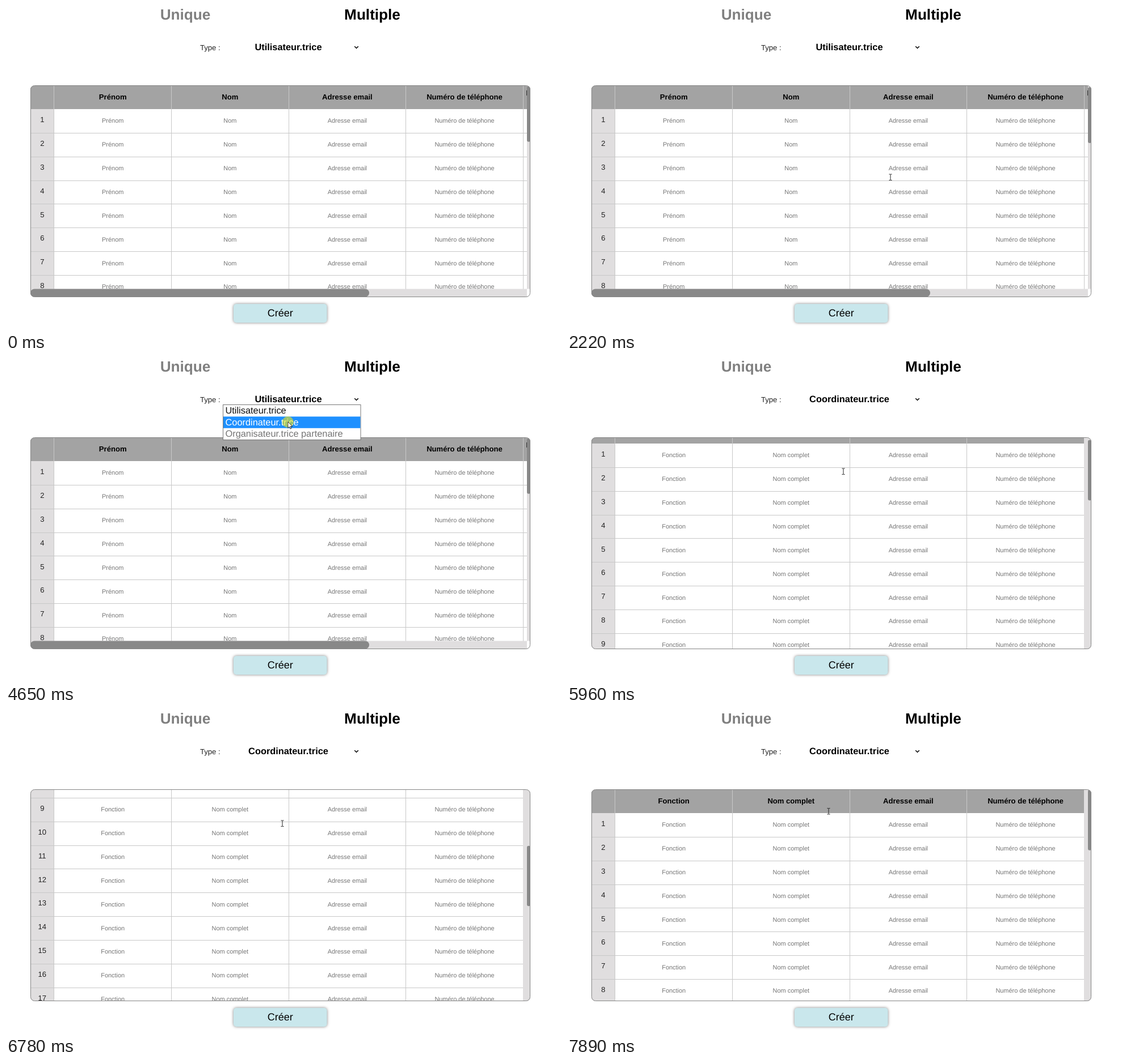
Write an HTML page that moves like this. It is 978x572 px and loops after 7.99 s.

```html
<!DOCTYPE html>
<html lang="fr">
<head>
<meta charset="utf-8">
<title>Création multiple</title>
<style>
  html, body { margin: 0; width: 100%; height: 100%; overflow: hidden; background: #fff; }
  svg { display: block; width: 978px; height: 572px; font-family: "Liberation Sans", Arial, sans-serif; font-size: 13.08px; text-rendering: geometricPrecision; }
  .mid text, text.mid { text-anchor: middle; }
  .title { font-size: 26.17px; font-weight: bold; }
  .value { font-size: 16.35px; font-weight: bold; }
  .head { font-weight: bold; }
  .cell { font-size: 10.95px; fill: #757575; }
  .option { font-size: 16.35px; }
  .line { stroke: #c8c8c8; shape-rendering: crispEdges; }
  .thumb { fill: #888; }
  .track { fill: #e0dedf; }
  .button { fill: #c9e7ec; filter: drop-shadow(0 0 2.5px rgba(0, 0, 0, .5)); }
</style>
</head>
<body>
<svg viewBox="0 0 978 572">
  <defs>
    <clipPath id="frame"><rect x="43" y="140.5" width="881" height="373.5" rx="7"/></clipPath>
  </defs>
  <text class="title mid" x="316" y="23.6" fill="#808080">Unique</text>
  <text class="title mid" x="645.5" y="23.6">Multiple</text>
  <text x="342" y="78.3" fill="#222">Type :</text>
  <text class="value mid" id="value" x="497.5" y="78.4"></text>
  <path d="M614.2 71.2l3.3 3.3 3.3-3.3" fill="none" stroke="#000" stroke-width="1.5"/>

  <g clip-path="url(#frame)">
    <g id="users"></g>
    <g id="coords"></g>
    <rect class="track" id="track" y="141" height="373"/>
    <g id="bottomBar">
      <rect x="918" y="499.5" width="6" height="15" fill="#fff"/>
      <rect class="track" x="43" y="499.5" width="875" height="14.5"/>
      <rect class="thumb" x="43" y="499.5" width="597" height="14" rx="7"/>
    </g>
    <rect class="thumb" id="thumb" x="918" width="6" rx="3"/>
  </g>
  <rect x="43.5" y="140.5" width="880" height="373" rx="7" fill="none" stroke="#858585"/>

  <rect class="button" x="401" y="526" width="164.5" height="33" rx="5"/>
  <text class="mid" x="483.3" y="548.2" font-size="18">Créer</text>

  <g id="menu">
    <rect x="382.5" y="82.5" width="242.5" height="62" fill="#fff" stroke="#777"/>
    <rect id="choice" x="383" width="241.5" height="20.4" fill="#1e90ff"/>
  </g>
  <circle id="click" r="10" fill="#ffeb00" fill-opacity=".55"/>
  <g id="cursor">
    <path id="arrow" d="M0 0V11.2L2.6 8.8 4.3 12.6 6 11.8 4.4 8.2H8Z" fill="#fff" stroke="#000" stroke-width=".8"/>
    <path id="beam" d="M-2.5-5H-.7L0-4.4.7-5H2.5M0-4.4V4.9M-2.5 5.5H-.7L0 4.9.7 5.5H2.5" fill="none" stroke="#222"/>
  </g>
</svg>
<script>
const LOOP = 7990, ROWS = 30, PITCH = 41.86, TOP = 182, CONTENT = 1297;
const EDGES = [84, 291, 498, 704, 911];
const $ = id => document.getElementById(id);
const show = (el, on) => el.style.display = on ? '' : 'none';
const clamp = (v, lo, hi) => Math.max(lo, Math.min(hi, v));

function add(parent, tag, attrs, text) {
  const el = document.createElementNS('http://www.w3.org/2000/svg', tag);
  for (const k in attrs) el.setAttribute(k, attrs[k]);
  if (text !== undefined) el.textContent = text;
  parent.append(el);
  return el;
}

function buildTable(g, names, right) {
  const box = (x, y, width, height, fill) => add(g, 'rect', { x, y, width, height, fill });
  const label = (x, y, cls, text) => add(g, 'text', { x, y, class: 'mid ' + cls }, text);
  const bottom = TOP + ROWS * PITCH;
  box(43, 141, right - 43, bottom - 141, '#fff');
  box(43, TOP, 41, bottom - TOP, '#e0dedf');
  box(43, 141, right - 43, 41, '#a3a3a3');
  for (const x of EDGES)
    add(g, 'path', { class: 'line', d: `M${x + .5} 141V${bottom}` });
  names.forEach((name, i) => label(188.2 + i * 206.6, 165.4, 'head', name));
  for (let r = 0; r < ROWS; r++) {
    const y = TOP + r * PITCH;
    add(g, 'path', { class: 'line', d: `M43 ${Math.round(y + PITCH) + .5}H${right}` });
    label(63.8, y + 23.1, '', r + 1).setAttribute('fill', '#222');
    names.forEach((name, i) => label(188.2 + i * 206.6, y + 24.4, 'cell', name));
  }
}

const contact = ['Adresse email', 'Numéro de téléphone'];
buildTable($('users'), ['Prénom', 'Nom', ...contact], 918);
buildTable($('coords'), ['Fonction', 'Nom complet', ...contact], 911);
// Edge of the fifth heading, mostly hidden by the scrollbar
add($('users'), 'rect', { x: 917, y: 149, width: 1, height: 9, fill: '#333' });

const options = ['Utilisateur.trice', 'Coordinateur.trice', 'Organisateur.trice partenaire']
  .map((name, i) => add($('menu'), 'text', { class: 'option', x: 386.5, y: 98.2 + i * 20.4 }, name));

// Number of ticks reached by time t when n of them run from a to b
const ticks = (t, a, b, n) =>
  t < a ? 0 : Math.min(n, 1 + Math.floor((t - a + .01) * (n - 1) / (b - a)));

const moves = [
  { a: 700, b: 1420, n: 8, to: [570, 302] },
  { a: 2610, b: 3230, n: 7, to: [505, 77.5] },
  { a: 3730, b: 4250, n: 6, to: [496.8, 112.5] },
  { a: 5150, b: 5460, n: 4, to: [487, 200] },
  { a: 7890, b: 7891, n: 1, to: [461, 178.5] }
];

function pointer(t) {
  let p = [867, 567];
  for (const m of moves) {
    const k = ticks(t, m.a, m.b, m.n) / m.n, e = k * k * (3 - 2 * k);
    p = p.map((v, i) => v + (m.to[i] - v) * e);
  }
  return p;
}

const scrolls = [
  { a: 1720, b: 2320, at: [0, 5, 64, 150, 130, 40, 0, 0] },
  { a: 5960, b: 6360, at: [0, 31, 110, 180, 230, 245] },
  { a: 6660, b: 7280, at: [245, 262, 362, 420, 330, 160, 30, 0] }
];

// Scroll offset, and the slightly late offset shown by the scrollbar
function scrolled(t) {
  const s = scrolls.filter(s => t >= s.a).pop();
  if (!s) return [0, 0];
  const k = ticks(t, s.a, s.b, s.at.length - 1), y = s.at[k];
  const moving = t < s.b + 100;
  return [y, moving ? y - clamp(y - s.at[k - 1], -8, 18) * (t < s.b) : y];
}

function draw(t) {
  const second = t >= 4850;
  const [y, late] = scrolled(t);
  const view = second ? 372 : 358;
  show($('users'), !second);
  show($('coords'), second);
  show($('bottomBar'), !second);
  $(second ? 'coords' : 'users').setAttribute('transform', `translate(0 ${-y})`);
  $('track').setAttribute('x', second ? 911 : 918);
  $('track').setAttribute('width', second ? 13 : 6);
  $('thumb').setAttribute('y', 141 + late * view / CONTENT);
  $('thumb').setAttribute('height', view * view / CONTENT);
  $('value').textContent = options[t >= 4750 ? 1 : 0].textContent;

  const [px, py] = pointer(t);
  const picked = py > 103 ? 1 : 0;
  const open = t >= 3330 && t < 4750;
  show($('menu'), open);
  $('menu').style.opacity = t < 3430 ? .5 : 1;
  $('choice').setAttribute('y', 83 + picked * 20.4);
  options.forEach((o, i) => o.setAttribute('fill', i === picked ? '#fff' : i === 2 ? '#757575' : '#111'));

  const over = !open && py > 141 && py < 499 && px > 85 && px < 911;
  show($('cursor'), t >= 700);
  show($('arrow'), !over);
  show($('beam'), over);
  $('cursor').setAttribute('transform', `translate(${px} ${py})`);
  show($('click'), t >= 3230 && t < 3530 || t >= 4650 && t < 4750);
  $('click').setAttribute('cx', px);
  $('click').setAttribute('cy', py + .5);
}

const start = performance.now();
function tick() {
  draw((performance.now() - start) % LOOP);
  requestAnimationFrame(tick);
}
tick();
</script>
</body>
</html>
```
